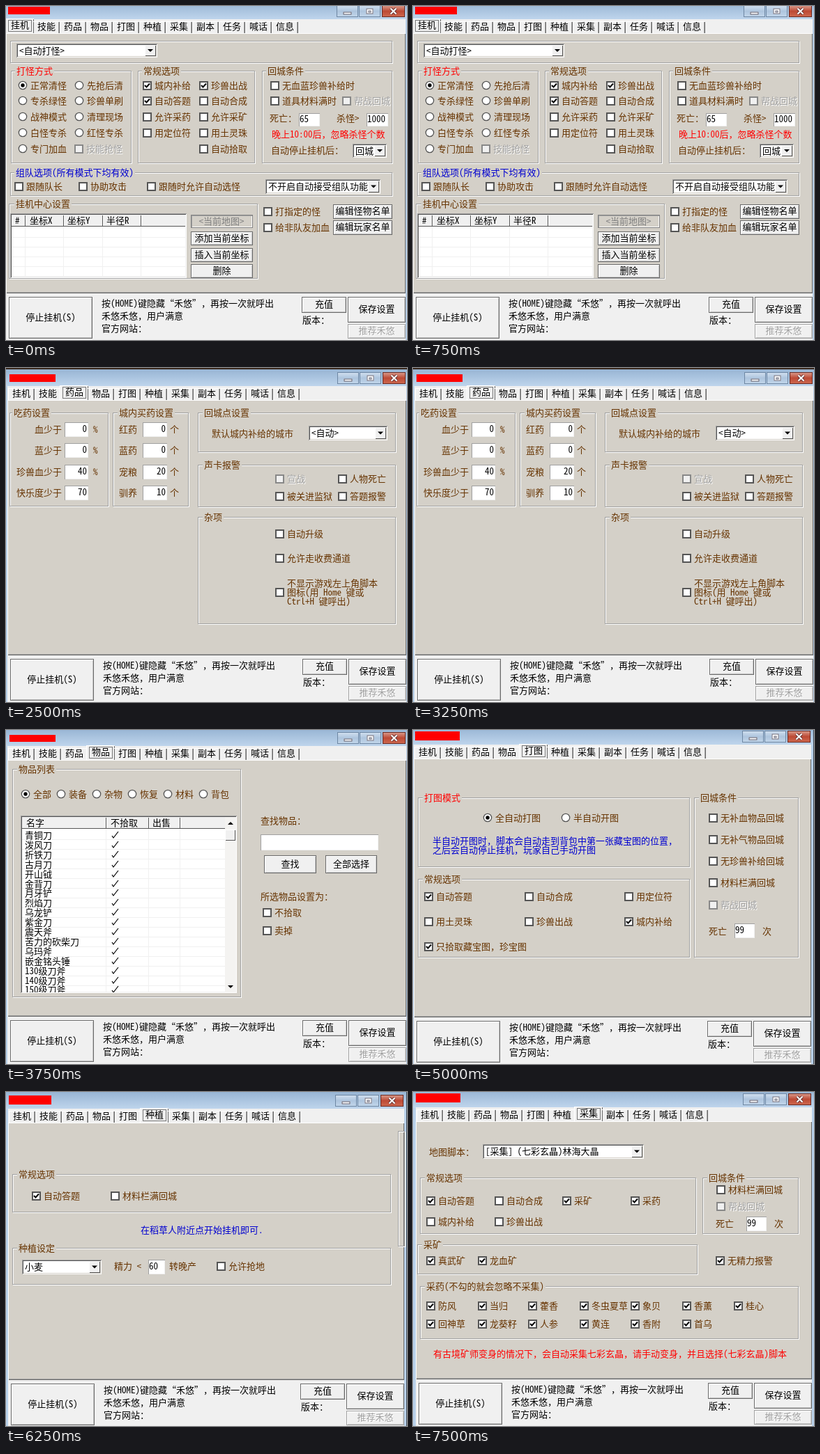
Recreate the animation shown at these times as an HTML page with a canvas. Size 575 by 480 pixels, loop 8 s.

```html
<!DOCTYPE html>
<html lang="zh-CN">
<head>
<meta charset="utf-8">
<style>
html, body { margin: 0; width: 100%; height: 100%; overflow: hidden; }
canvas { display: block; }
</style>
</head>
<body>
<canvas id="stage" width="575" height="480"></canvas>
<script>
const ctx = document.getElementById('stage').getContext('2d');
const FACE = '#d4d0c8', LIGHT = '#f0f0f0', BROWN = '#663300', RED = '#f00', BLUE = '#0000d0';
const GRAY = '#a0a0a0', DARK = '#555';
const FONT = '13px "Noto Sans Mono CJK SC", "Noto Sans CJK SC", "Noto Sans CJK", monospace';

// Basic drawing; text is placed by its vertical centre.
function fill(color, x, y, w, h) { ctx.fillStyle = color; ctx.fillRect(x, y, w, h); }
function frame(color, x, y, w, h) { ctx.strokeStyle = color; ctx.strokeRect(x + .5, y + .5, w - 1, h - 1); }
function bevel(x, y, w, h, topLeft, bottomRight) {
  fill(bottomRight, x, y + h - 1, w, 1);
  fill(bottomRight, x + w - 1, y, 1, h);
  fill(topLeft, x, y, w, 1);
  fill(topLeft, x, y, 1, h);
}
function line(color, width, ...p) {
  ctx.strokeStyle = color;
  ctx.lineWidth = width;
  ctx.beginPath();
  for (let i = 0; i < p.length; i += 2) ctx.lineTo(p[i], p[i + 1]);
  ctx.stroke();
  ctx.lineWidth = 1;
}
function text(s, x, y, color = BROWN, align = 'left') {
  ctx.fillStyle = color;
  ctx.textAlign = align;
  ctx.fillText(s, x, Math.round(y + 4.5));
}
function grayText(s, x, y, align) {
  text(s, x + 1, y + 1, '#fff', align);
  text(s, x, y, GRAY, align);
}
function arrow(x, y, dir = 1) {
  ctx.fillStyle = '#000';
  ctx.beginPath();
  ctx.moveTo(x - 4, y - 2 * dir);
  ctx.lineTo(x + 4, y - 2 * dir);
  ctx.lineTo(x, y + 2 * dir);
  ctx.fill();
}

// Controls
function group(title, x, y, right, bottom, color = BROWN, titleX = x + 9) {
  frame('#fff', x + 1, y + 1, right - x, bottom - y);
  frame(GRAY, x, y, right - x, bottom - y);
  if (title) {
    fill(FACE, titleX - 2, y - 6, ctx.measureText(title).width + 4, 13);
    text(title, titleX, y, color);
  }
}
function check(label, x, y, on, disabled) {
  fill(disabled ? LIGHT : '#fff', x, y - 6, 13, 13);
  ctx.lineWidth = 2;
  ctx.strokeStyle = disabled ? '#888' : DARK;
  ctx.strokeRect(x + 1, y - 5, 11, 11);
  ctx.lineWidth = 1;
  if (on) line('#000', 2, x + 3, y, x + 5.5, y + 2.5, x + 10, y - 2.5);
  (disabled ? grayText : text)(label, x + 17, y);
}
const checks = (labels, xs, y, on) => labels.split(' ').forEach((s, i) => check(s, xs[i], y, on));
function radio(label, x, y, on, gap = 17) {
  const dot = (r, color) => {
    ctx.fillStyle = color;
    ctx.beginPath();
    ctx.arc(x + 6, y, r, 0, 7);
    ctx.fill();
  };
  dot(6.3, DARK);
  dot(5, '#fff');
  if (on) dot(2.7, '#000');
  text(label, x + gap, y);
}
function button(label, x, y, right, bottom, disabled) {
  const w = right - x, h = bottom - y;
  fill(LIGHT, x, y, w, h);
  bevel(x + 1, y + 1, w - 2, h - 2, '#fff', '#c8c8c8');
  frame(disabled ? GRAY : '#696969', x, y, w, h);
  (disabled ? grayText : text)(label, x + w / 2, y + h / 2 - 1, disabled ? 'center' : '#000', 'center');
}
function input(value, x, y, right, bottom, alignRight) {
  fill('#fff', x, y, right - x, bottom - y);
  bevel(x, y, right - x, bottom - y, GRAY, LIGHT);
  text(value, alignRight ? right - 2 : x + 1, (y + bottom) / 2 - 1, '#000', alignRight ? 'right' : 'left');
}
function select(value, x, y, right, bottom) {
  const w = right - x, h = bottom - y;
  fill('#fff', x, y, w, h);
  bevel(x, y, w, h, GRAY, '#fff');
  bevel(x + 1, y + 1, w - 2, h - 2, DARK, FACE);
  fill(LIGHT, right - 18, y + 2, 16, h - 4);
  bevel(right - 18, y + 2, 16, h - 4, '#fff', DARK);
  arrow(right - 10, y + h / 2);
  text(value, x + 4, y + h / 2, '#000');
}
function list(x, y, right, bottom, heads, seps) {
  const w = right - x, h = bottom - y;
  fill('#fff', x, y, w, h);
  for (let row = y + 34; row < bottom; row += 14) fill(LIGHT, x + 2, row, w - 3, 1);
  seps.forEach(s => fill(LIGHT, s, y, 1, h));
  fill(LIGHT, x + 2, y + 2, w - 3, 17);
  fill(DARK, x + 2, y + 18, w - 3, 1);
  seps.forEach(s => { fill(DARK, s, y + 3, 1, 16); fill('#fff', s + 1, y + 3, 1, 15); });
  heads.forEach(([s, hx]) => text(s, hx, y + 10, '#000'));
  bevel(x, y, w, h, GRAY, '#fff');
  bevel(x + 1, y + 1, w - 2, h - 2, DARK, LIGHT);
}

// Pages
function combat() {
  group('', 6, 50, 554, 82);
  select('<自动打怪>', 15, 54, 217, 74);
  group('打怪方式', 7, 93, 180, 226, RED, 15);
  const rows = [114, 136, 159, 182, 205];
  '正常清怪 专杀绿怪 战神模式 白怪专杀 专门加血'.split(' ').forEach((s, i) => radio(s, 18, rows[i], !i));
  '先抢后清 珍兽单刷 清理现场 红怪专杀'.split(' ').forEach((s, i) => radio(s, 99, rows[i]));
  check('技能抢怪', 98, 205, false, true);
  group('常规选项', 189, 93, 357, 226, BROWN, 197);
  '城内补给 自动答题 允许采药 用定位符'.split(' ').forEach((s, i) => check(s, 196, rows[i], i < 2));
  '珍兽出战 自动合成 允许采矿 用土灵珠 自动拾取'.split(' ').forEach((s, i) => check(s, 277, rows[i], !i));
  group('回城条件', 367, 93, 554, 226, BROWN, 375);
  check('无血蓝珍兽补给时', 379, 114);
  check('道具材料满时', 379, 136);
  check('帮战回城', 482, 136, false, true);
  text('死亡：', 378, 161);
  input('65', 420, 154, 450, 173);
  text('杀怪>', 474, 161);
  input('1000', 517, 154, 548, 173);
  text('晚上10:00后，忽略杀怪个数', 381, 184, RED);
  text('自动停止挂机后：', 380, 207);
  select('回城', 497, 198, 546, 218);
  group('组队选项(所有模式下均有效)', 6, 239, 554, 273, BLUE, 14);
  checks('跟随队长 协助攻击 跟随时允许自动选怪', [12, 104, 202], 259);
  select('不开启自动接受组队功能', 372, 249, 537, 270);
  group('挂机中心设置', 4, 284, 361, 392, BROWN, 14);
  list(6, 298, 259, 391, [['#', 13], ['坐标X', 34], ['坐标Y', 88], ['半径R', 144]], [27, 82, 138, 193]);
  fill(FACE, 265, 300, 89, 19);
  frame('#808080', 265, 300, 89, 19);
  bevel(266, 301, 87, 17, GRAY, '#fff');
  text('<当前地图>', 309, 309, '#808080', 'center');
  button('添加当前坐标', 265, 324, 354, 344);
  button('插入当前坐标', 265, 348, 354, 368);
  button('删除', 265, 371, 354, 391);
  check('打指定的怪', 369, 295);
  check('给非队友加血', 369, 318);
  button('编辑怪物名单', 469, 285, 554, 306);
  button('编辑玩家名单', 469, 308, 554, 329);
}
function skills() {
  radio('攻击', 33, 72, true, 11);
  radio('辅助', 87, 72, false, 11);
  radio('组队', 144, 72, false, 11);
  list(5, 86, 183, 394, [['所学技能', 12]], [157]);
  '普通攻击 内劲攻击 流云矢 万箭齐发 铁蒺藜 一叶障目'.split(' ')
    .forEach((s, i) => text(s, 11, 114 + 14 * i, '#000'));
  list(250, 86, 555, 224, [['技能', 258]], [402]);
  button('-->', 197, 140, 232, 166);
  button('<--', 197, 196, 232, 222);
  check('开启高级设定', 250, 240);
  grayText('<Empty>', 385, 240);
  text('每修改完一个技能记得点保存', 317, 385, RED);
}
function medicine() {
  group('吃药设置', 5, 64, 147, 199, BROWN, 11);
  group('城内买药设置', 153, 64, 262, 199, BROWN, 162);
  const rows = [
    ['血少于', 0, '红药', 0], ['蓝少于', 0, '蓝药', 0],
    ['珍兽血少于', 40, '宠粮', 20], ['快乐度少于', 70, '驯养', 10]];
  rows.forEach(([need, level, item, count], i) => {
    const y = Math.round(88 + 30.4 * i);
    text(need, 80, y, BROWN, 'right');
    input(level, 84, y - 10, 118, y + 11, true);
    if (i < 3) text('%', 125, y);
    text(item, 162, y);
    input(count, 196, y - 10, 231, y + 11, true);
    text('个', 235, y);
  });
  group('回城点设置', 275, 64, 559, 121);
  text('默认城内补给的城市', 295, 94);
  select('<自动>', 434, 83, 547, 104);
  group('声卡报警', 275, 139, 559, 200);
  check('宣战', 386, 159, false, true);
  check('人物死亡', 476, 159);
  checks('被关进监狱 答题报警', [386, 476], 184);
  group('杂项', 275, 214, 559, 368);
  check('自动升级', 386, 238);
  check('允许走收费通道', 386, 273);
  text('不显示游戏左上角脚本', 403, 309);
  check('图标(用 Home 键或', 386, 322);
  text('Ctrl+H 键呼出)', 403, 335);
}
function items() {
  group('物品列表', 9, 56, 337, 384);
  '全部 装备 杂物 恢复 材料 背包'.split(' ').forEach((s, i) => radio(s, 22 + Math.round(50.9 * i), 92, !i));
  list(21, 123, 331, 378, [['名字', 29], ['不拾取', 150], ['出售', 210]], [143, 204, 249]);
  ctx.save();
  ctx.beginPath();
  ctx.rect(23, 125, 306, 252);
  ctx.clip();
  ('青铜刀 泼风刀 折铁刀 古月刀 开山钺 金背刀 月牙铲 烈焰刀 乌龙铲 紫金刀 震天斧 ' +
   '苦力的砍柴刀 乌玛斧 嵌金铭头锤 130级刀斧 140级刀斧 150级刀斧').split(' ').forEach((s, i) => {
    const y = Math.round(151 + 13.9 * i);
    text(s, 27, y, '#000');
    line('#000', 1.2, 152, y + 1, 154, y + 4, 161, y - 5);
  });
  ctx.restore();
  fill('#f4f3f1', 314, 125, 16, 252);
  arrow(322, 134, -1);
  arrow(322, 369);
  fill(LIGHT, 314, 143, 15, 16);
  bevel(314, 143, 15, 16, '#fff', DARK);
  text('查找物品：', 365, 130);
  input('', 365, 150, 534, 173);
  button('查找', 370, 180, 445, 206);
  button('全部选择', 458, 180, 532, 206);
  text('所选物品设置为：', 365, 239);
  check('不拾取', 368, 262);
  check('卖掉', 368, 288);
}
function maps() {
  group('打图模式', 7, 97, 397, 197, RED);
  radio('全自动打图', 101, 126, true);
  radio('半自动开图', 213, 126);
  text('半自动开图时，脚本会自动走到背包中第一张藏宝图的位置，', 28, 159, BLUE);
  text('之后会自动停止挂机，玩家自己手动开图', 28, 172, BLUE);
  group('常规选项', 7, 214, 397, 327);
  check('自动答题', 16, 239, true);
  checks('自动合成 用定位符', [160, 303], 239);
  checks('用土灵珠 珍兽出战', [16, 160], 275);
  check('城内补给', 303, 275, true);
  check('只拾取藏宝图，珍宝图', 16, 311, true);
  group('回城条件', 403, 97, 553, 327);
  '无补血物品回城 无补气物品回城 无珍兽补给回城 材料栏满回城'.split(' ')
    .forEach((s, i) => check(s, 424, 126 + 31 * i));
  check('帮战回城', 424, 251, false, true);
  text('死亡', 424, 289);
  input('99', 461, 278, 490, 299);
  text('次', 501, 289);
}
function planting() {
  group('', 562, 56, 572, 222);
  group('常规选项', 9, 118, 552, 173);
  check('自动答题', 37, 149, true);
  check('材料栏满回城', 150, 149);
  text('在稻草人附近点开始挂机即可.', 193, 198, BLUE);
  group('种植设定', 9, 224, 552, 277);
  select('小麦', 23, 241, 137, 262);
  text('精力 <', 155, 250);
  input('60', 204, 241, 228, 262);
  text('转晚产', 234, 250);
  check('允许抢地', 302, 250);
}
function gathering() {
  text('地图脚本：', 23, 86);
  select('[采集] (七彩玄晶)林海大晶', 100, 75, 331, 96);
  group('常规选项', 10, 123, 406, 204);
  checks('自动答题 采矿 采药', [19, 214, 312], 156, true);
  check('自动合成', 117, 156);
  checks('城内补给 珍兽出战', [19, 117], 186);
  group('回城条件', 415, 123, 553, 204);
  check('材料栏满回城', 435, 140);
  check('帮战回城', 435, 164, false, true);
  text('死亡', 434, 189);
  input('99', 478, 179, 507, 200);
  text('次', 518, 189);
  group('采矿', 6, 219, 408, 262);
  checks('真武矿 龙血矿 无精力报警', [19, 93, 434], 242, true);
  group('采药(不勾的就会忽略不采集)', 10, 279, 553, 355);
  const columns = [19, 93, 165, 239, 312, 386, 460];
  checks('防风 当归 藿香 冬虫夏草 象贝 香薰 桂心', columns, 307, true);
  checks('回神草 龙葵籽 人参 黄连 香附 首乌', columns, 333, true);
  text('有古境矿师变身的情况下，会自动采集七彩玄晶，请手动变身，并且选择(七彩玄晶)脚本', 29, 376, RED);
}

const TABS = '挂机 技能 药品 物品 打图 种植 采集 副本 任务 喊话 信息'.split(' ');

// The window sits slightly differently on each page:
// left and right anchors, tab centre, footer top, title cover box.
const PAGES = [
  [combat, 4, 490, 30, 418, [3, 1, 60, 11]],
  [skills, 3, 489, 33, 416, [3, 4, 59, 14]],
  [medicine, 6, 491, 37, 418, [5, 9, 66, 11]],
  [items, 6, 491, 34, 417, [5, 7, 66, 10]],
  [maps, 5, 488, 32, 418, [3, 2, 64, 13]],
  [planting, 7, 488, 35, 419, [4, 5, 61, 13]],
  [gathering, 8, 489, 33, 418, [4, 2, 64, 13]]];

function titleBar(right, tabY, cover) {
  const bottom = tabY - 14, top = bottom - 17;
  const sky = ctx.createLinearGradient(0, top - 4, 0, bottom + 4);
  sky.addColorStop(0, '#98b5d4');
  sky.addColorStop(1, '#c0d6ed');
  fill(sky, 0, 0, 575, bottom + 4);
  if (top > 4) fill('#3a2a20', 0, 0, 575, top - 4);
  [[right - 16, 31], [right + 16, 31], [right + 49, 33]].forEach(([x, w], i) => {
    const shade = ctx.createLinearGradient(0, top, 0, bottom);
    shade.addColorStop(0, i == 2 ? '#dba091' : '#d3e1f0');
    shade.addColorStop(.5, i == 2 ? '#bd4a35' : '#aec5de');
    shade.addColorStop(1, i == 2 ? '#cf6a50' : '#c3d7eb');
    fill(shade, x, top, w, 17);
    frame(i == 2 ? '#6b2a22' : '#6e87a3', x, top, w, 17);
    const cx = x + w / 2, cy = top + 8.5;
    if (i == 0) { fill('#fff', cx - 6, cy + 1, 12, 4); frame('#556', cx - 6, cy + 1, 12, 4); }
    if (i == 1) { fill('#fff', cx - 5, cy - 4, 10, 8); frame('#667', cx - 5, cy - 4, 10, 8); frame('#667', cx - 2, cy - 1, 4, 3); }
    if (i == 2) {
      for (const [color, width] of [['#633', 4], ['#fff', 2.2]]) {
        line(color, width, cx - 4, cy - 4, cx + 4, cy + 4);
        line(color, width, cx + 4, cy - 4, cx - 4, cy + 4);
      }
    }
  });
  fill(RED, ...cover);
}
function tabStrip(left, tabY, active) {
  TABS.forEach((name, i) => {
    const x = left - 3 + 38 * i, on = i == active, y = tabY - (on ? 2 : 0);
    if (on) {
      fill(LIGHT, x - 2, y - 10, 41, 21);
      bevel(x - 2, y - 10, 41, 21, '#fff', '#696969');
      fill(LIGHT, x - 1, y + 10, 39, 1);
      ctx.setLineDash([1, 1]);
      frame('#000', x + 2, y - 8, 34, 17);
      ctx.setLineDash([]);
    } else {
      fill('#fff', x, y - 8, 37, 1);
      if (i != active + 1) fill('#fff', x, y - 7, 1, 16);
      if (i != active - 1) { fill('#696969', x + 37, y - 7, 1, 16); fill(GRAY, x + 36, y - 7, 1, 16); }
    }
    text(name, x + 6, y - 1, '#000');
  });
}
function footer(left, right, y) {
  button('停止挂机(S)', left, y, left + 120, y + 60);
  text('按(HOME)键隐藏“禾悠”，再按一次就呼出', left + 133, y + 9, '#000');
  text('禾悠禾悠，用户满意', left + 133, y + 27, '#000');
  text('官方网站：', left + 133, y + 45, '#000');
  button('充值', right - 66, y, right - 2, y + 23);
  text('版本：', right - 65, y + 33, '#000');
  button('保存设置', right, y, right + 83, y + 37);
  button('推荐禾悠', right, y + 39, right + 83, y + 60, true);
}
function draw(index) {
  const [page, left, right, tabY, footY, cover] = PAGES[index];
  const x = left - 4, w = right + 83 - x, top = tabY + 9;
  ctx.font = FONT;
  fill('#b9d1ea', 0, 0, 575, 480);
  titleBar(right, tabY, cover);
  fill('#404a55', right + 86, 0, 1, 480);
  fill(LIGHT, x, tabY - 11, w, 480);
  fill(FACE, x, top, w, footY - 6 - top);
  bevel(x, top, w, footY - 5 - top, '#fff', '#696969');
  fill(GRAY, x + 1, footY - 7, w - 2, 1);
  tabStrip(left, tabY, index);
  page();
  footer(left, right, footY);
}

let shown = -1;
function tick() {
  const index = Math.floor(performance.now() % 8000 / 1250);
  if (index != shown) draw(shown = index);
  requestAnimationFrame(tick);
}
tick();
</script>
</body>
</html>
```
